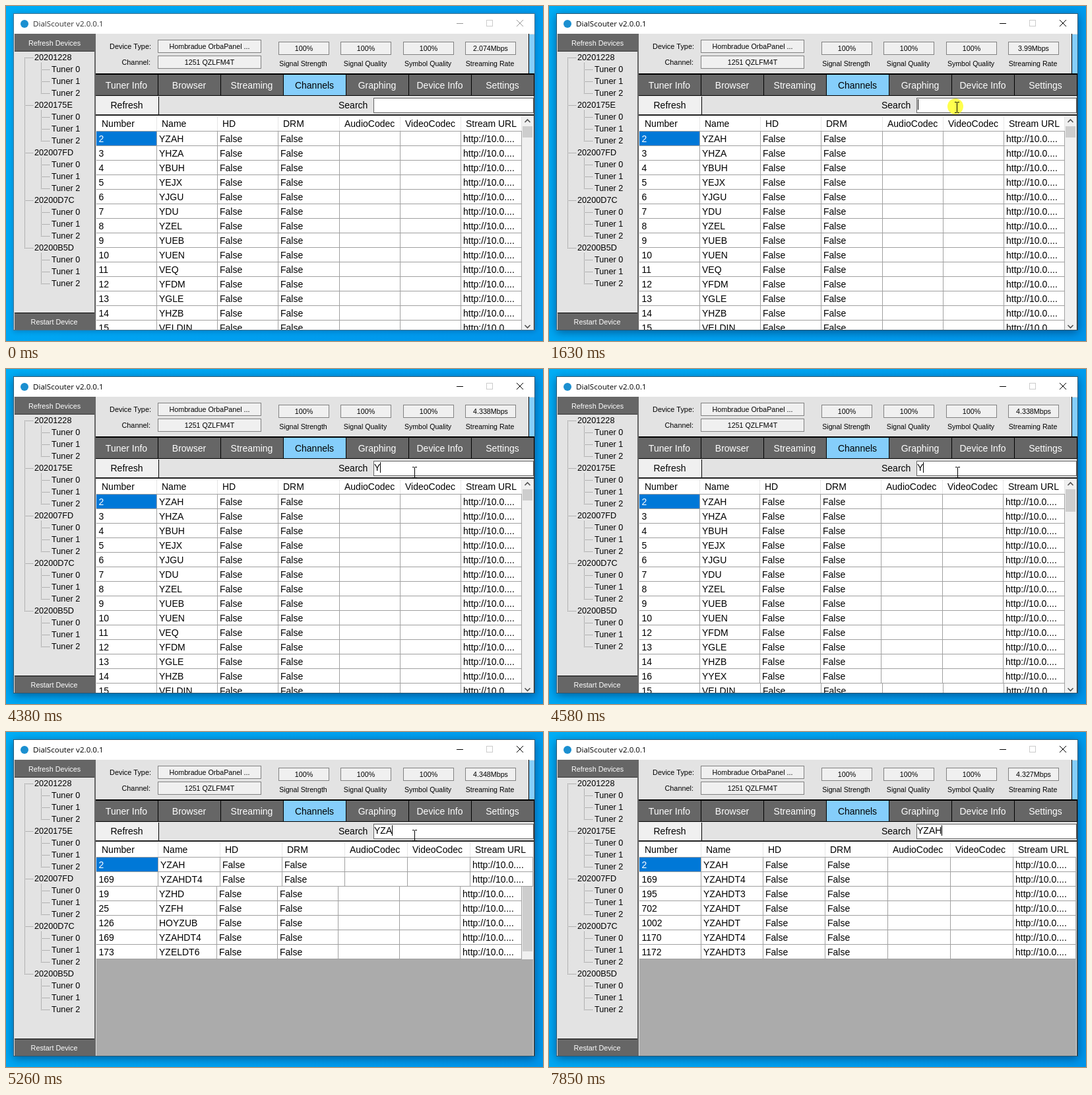
These frames come from a looping animation (814x507 px, 8000 ms). An HTML page with a canvas:

```html
<!DOCTYPE html>
<html lang="en">
<head>
<meta charset="utf-8">
<title>Channel search</title>
<style>
  html, body { margin: 0; width: 100%; height: 100%; overflow: hidden; background: #00a2f0; }
  canvas { display: block; }
</style>
</head>
<body>
<canvas id="stage" width="814" height="507"></canvas>
<script>
const ctx = document.getElementById('stage').getContext('2d');
const LOOP = 8000;
const PANEL = '#e3e3e3', DARK = '#666', SKY = '#85cefb', LINE = '#a0a0a0';

const channels = `2 YZAH,3 YHZA,4 YBUH,5 YEJX,6 YJGU,7 YDU,8 YZEL,9 YUEB,10 YUEN,11 VEQ,
12 YFDM,13 YGLE,14 YHZB,15 VELDIN,16 YYEX,17 YEBU,19 YZHD,25 YZFH,126 HOYZUB,169 YZAHDT4,
173 YZELDT6,195 YZAHDT3,702 YZAHDT,708 YZELDT,719 YZHDDT,1002 YZAHDT,1170 YZAHDT4,1172 YZAHDT3`
  .split(',').map(row => row.trim().split(' '));
const headers = ['Number', 'Name', 'HD', 'DRM', 'AudioCodec', 'VideoCodec', 'Stream URL'];
const tabs = ['Tuner Info', 'Browser', 'Streaming', 'Channels', 'Graphing', 'Device Info', 'Settings'];

// Right edge of every column, with and without the scrollbar
const firstColumns = [228, 320, 412, 505, 597, 689, 781];
const tightColumns = [228, 319, 411, 503, 596, 688, 781];
const wideColumns = [230, 324, 418, 513, 608, 703, 798];

// Timelines: [start, value]
const typed = [[0, ''], [4320, 'Y'], [4780, 'YZ'], [5190, 'YZA'], [5660, 'YZAH']];
const rates = [[0, '2.074'], [650, '3.412'], [1560, '3.99'], [2630, '4.274'], [3720, '4.338'],
  [4720, '4.348'], [6790, '4.339'], [7780, '4.327']];
const caret = [[0, 0], [1630, 1], [2230, 0], [2760, 1], [3240, 0], [3790, 1], [6260, 0], [6790, 1],
  [7320, 0], [7850, 1]];

const valueAt = (steps, t) => steps.filter(step => step[0] <= t).pop()[1];

function rect(x, y, w, h, color) {
  ctx.fillStyle = color;
  ctx.fillRect(x, y, w, h);
}

function box(x, y, w, h, fill, border) {
  rect(x, y, w, h, border);
  rect(x + 1, y + 1, w - 2, h - 2, fill);
}

function text(str, x, y, size = 14, color = '#000', align = 'left', family = '"Liberation Sans", Arial, sans-serif') {
  ctx.font = `${size}px ${family}`;
  ctx.textAlign = align;
  ctx.fillStyle = color;
  ctx.fillText(str, x, y);
}

function stroke(points, color, width = 1) {
  ctx.beginPath();
  points.forEach(([x, y], i) => i ? ctx.lineTo(x, y) : ctx.moveTo(x, y));
  ctx.strokeStyle = color;
  ctx.lineWidth = width;
  ctx.stroke();
}

function dots(x, y, w, h) {
  for (let d = 0; d <= w + h; d += 2) rect(x + (w ? d : 0), y + (h ? d : 0), 1, 1, '#808080');
}

function clipped(x, y, w, h, draw) {
  ctx.save();
  ctx.beginPath();
  ctx.rect(x, y, w, h);
  ctx.clip();
  draw();
  ctx.restore();
}

function drawWindow(active) {
  const sky = ctx.createLinearGradient(0, 0, 814, 507);
  sky.addColorStop(0, '#00adf6');
  sky.addColorStop(1, '#0094ea');
  rect(0, 0, 814, 507, sky);

  ctx.save();
  ctx.shadowColor = `rgba(0,20,60,${active ? 0.5 : 0.3})`;
  ctx.shadowBlur = active ? 13 : 8;
  ctx.shadowOffsetY = active ? 3 : 1;
  rect(11, 11, 791, 480, active ? '#2b5873' : '#47748f');
  ctx.restore();

  rect(12, 12, 789, 30, '#fff');
  ctx.beginPath();
  ctx.arc(28, 27, 6, 0, 7);
  ctx.fillStyle = '#1b8fd0';
  ctx.fill();
  text('DialScouter v2.0.0.1', 41, 31, 11.6, active ? '#000' : '#333', 'left', '"Open Sans", "Noto Sans", sans-serif');

  const ink = active ? '#000' : '#999';
  rect(683, 26, 10, 1, ink);
  box(728, 21, 10, 10, '#fff', '#ccc');
  stroke([[774, 21], [784, 31]], ink);
  stroke([[784, 21], [774, 31]], ink);
  rect(12, 42, 789, 448, PANEL);
}

function drawSidebar() {
  rect(13, 42, 121, 26, DARK);
  rect(13, 68, 121, 1, '#333');
  rect(13, 464, 121, 1, '#000');
  rect(13, 465, 121, 25, DARK);
  rect(134, 42, 2, 448, DARK);
  text('Refresh Devices', 73.5, 60, 10.8, '#fff', 'center');
  text('Restart Device', 73, 482, 10.8, '#fff', 'center');

  dots(28, 78, 0, 288);
  ['20201228', '2020175E', '202007FD', '20200D7C', '20200B5D'].forEach((id, group) => {
    const y = 77 + group * 72;
    dots(28, y + 1, 12, 0);
    text(id, 43, y + 5, 12.7);
    dots(53, y + 9, 0, 46);
    for (let n = 0; n < 3; n++) {
      dots(53, y + 19 + n * 18, 12, 0);
      text('Tuner ' + n, 69, y + 23 + n * 18, 12.7);
    }
  });
}

function drawStatus(rate) {
  const field = (x, y, w, h, label) => {
    box(x, y, w, h, '#f0f0f0', '#828282');
    text(label, x + w / 2, y + h / 2 + 4, 10.7, '#000', 'center');
  };
  text('Device Type:', 220, 65, 10.9, '#000', 'right');
  text('Channel:', 219, 89, 10.9, '#000', 'right');
  field(230, 51, 157, 20, 'Hombradue OrbaPanel ...');
  field(230, 75, 157, 20, '1251 QZLFM4T');
  ['Signal Strength', 'Signal Quality', 'Symbol Quality', 'Streaming Rate'].forEach((label, i) => {
    const x = Math.round(413 + i * 94.4);
    field(x, 54, 77, 20, i < 3 ? '100%' : rate + 'Mbps');
    text(label, x + 37.5, 91, 10.6, '#000', 'center');
  });
  rect(792, 42, 1, 60, '#000');
  rect(793, 43, 8, 59, SKY);
}

function drawTabs() {
  rect(136, 102, 665, 34, '#000');
  tabs.forEach((label, i) => {
    const x = i ? Math.round(135.5 + i * 95) : 136;
    const end = i < 6 ? Math.round(135.5 + (i + 1) * 95) - 1 : 800;
    const selected = i === 3;
    rect(x, 104, end - x, 31, selected ? SKY : DARK);
    text(label, (x + end) / 2 - 0.5, 125, 14, selected ? '#000' : '#fff', 'center');
  });
}

function drawSearch(query, showCaret) {
  rect(136, 136, 665, 28, PANEL);
  rect(137, 137, 94, 27, '#f0f0f0');
  rect(231, 137, 1, 27, '#000');
  rect(136, 164, 665, 2, '#222');
  text('Refresh', 183, 155, 14, '#000', 'center');
  text('Search', 504, 155);
  box(557, 139, 243, 23, '#fff', '#646464');
  text(query, 558, 154);
  if (showCaret) {
    const x = Math.max(559, Math.floor(558 + ctx.measureText(query).width));
    rect(x, 141, 1, 16, '#000');
  }
}

function drawScrollbar(thumb) {
  rect(782, 166, 17, 324, '#f0f0f0');
  rect(783, 182, 15, thumb, '#cdcdcd');
  stroke([[786.5, 176], [790.5, 172], [794.5, 176]], '#505050', 1.6);
  stroke([[786.5, 483], [790.5, 487], [794.5, 483]], '#505050', 1.6);
}

// Paints the result table between two heights
function drawGrid(query, columns, thumb, top = 166, bottom = 490) {
  clipped(137, top, 662, bottom - top, () => {
    const left = i => i ? columns[i - 1] : 137;
    const right = columns[6];
    rect(137, 166, 662, 324, '#ababab');
    rect(137, 166, right - 136, 23, '#fff');
    rect(137, 189, right - 136, 1, LINE);
    headers.forEach((label, i) => {
      text(label, left(i) + 8, 183);
      rect(columns[i], 167, 1, 22, '#e5e5e5');
    });
    channels.filter(row => row[1].includes(query)).slice(0, 14).forEach(([number, name], r) => {
      const y = 190 + r * 22;
      rect(137, y, right - 136, 21, '#fff');
      rect(137, y + 21, right - 136, 1, LINE);
      if (!r) rect(137, y, columns[0] - 137, 21, '#0078d7');
      [number, name, 'False', 'False', '', '', 'http://10.0....'].forEach((cell, i) => {
        text(cell, left(i) + (i ? 4 : 3.5), y + 16, 14, r || i ? '#000' : '#fff');
        rect(columns[i], y, 1, 22, LINE);
      });
    });
    if (thumb) drawScrollbar(thumb);
  });
}

function drawResults(t) {
  const all = (...span) => drawGrid('', firstColumns, 17, ...span);
  const one = (...span) => drawGrid('Y', tightColumns, 34, ...span);
  const two = (...span) => drawGrid('YZ', tightColumns, 150, ...span);
  const three = (...span) => drawGrid('YZA', wideColumns, 0, ...span);
  if (t < 4580) all();
  else if (t < 4650) { one(166, 476); all(476); }
  else if (t < 4850) one();
  else if (t < 5260) two();
  else {
    three();
    if (t < 5330) two(234, 344);
  }
  rect(799, 166, 1, 324, PANEL);
  rect(800, 136, 1, 354, '#333');
}

function drawBeam(x, y) {
  rect(x, y - 7, 1, 15, '#000');
  for (const end of [y - 8, y + 8]) {
    rect(x - 3, end, 3, 1, '#000');
    rect(x + 1, end, 3, 1, '#000');
  }
}

function drawArrow(x, y) {
  const outline = [[0, 0], [0, 16], [4, 12.5], [6.5, 18.5], [9, 17.5], [6.5, 11.5], [11.5, 11.5], [0, 0]];
  stroke(outline.map(([dx, dy]) => [x + dx + 0.5, y + dy + 0.5]), '#000');
  ctx.fillStyle = '#fff';
  ctx.fill();
}

function drawPointer(t) {
  if (t < 520 || t >= 5660) return;
  if (t >= 1560 && t < 1690) {
    ctx.beginPath();
    ctx.arc(616, 152, 12, 0, 7);
    ctx.fillStyle = '#ffff4d';
    ctx.fill();
    drawBeam(618, 153);
    return;
  }
  if (t >= 1360) {
    const [x, y] = t < 1420 ? [621, 156] : t < 1960 ? [618, 153] : t < 2030 ? [618, 155] : [619, 156];
    drawBeam(x, y);
    return;
  }
  // The pointer glides up from the bottom edge in discrete updates
  const p = Math.min(1, (Math.floor((t - 520) / 70) + 1) / 12);
  const ease = p * p * (3 - 2 * p);
  const x = Math.round(690 - 66 * ease), y = Math.round(505 - 347 * ease);
  y < 164 ? drawBeam(x, y) : drawArrow(x, y);
}

function frame(now) {
  const t = now % LOOP;
  drawWindow(t >= 1560);
  drawSidebar();
  drawStatus(valueAt(rates, t));
  drawTabs();
  drawSearch(valueAt(typed, t), valueAt(caret, t));
  drawResults(t);
  drawPointer(t);
  requestAnimationFrame(frame);
}
requestAnimationFrame(frame);
</script>
</body>
</html>
```
